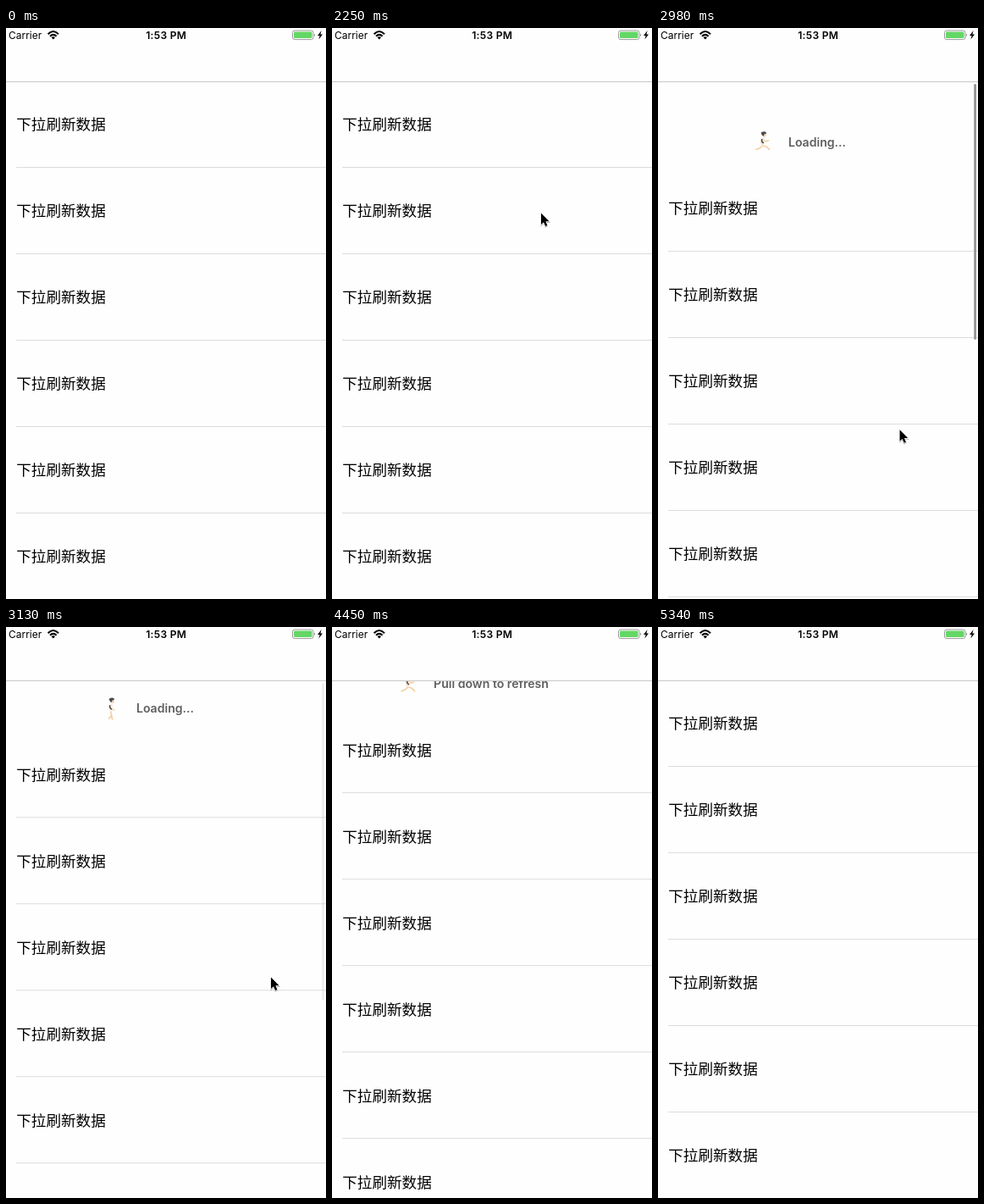
Write an HTML page that moves like this. It is 378 px wide and 674 px high and loops after 5830 ms.

```html
<!DOCTYPE html>
<html lang="zh-CN">
<head>
<meta charset="utf-8">
<title>Pull to refresh</title>
<style>
  html, body { margin: 0; width: 100%; height: 100%; overflow: hidden; background: #fefefe; }
  svg { display: block; width: 378px; height: 674px; }
  text { font-family: Inter, Roboto, sans-serif; fill: #000; }
  .row text { font: 17.6px "Noto Sans CJK SC", "Noto Sans CJK", "Noto Sans", sans-serif; }
  #label { font-size: 14.1px; font-weight: 600; fill: #5f5f5f; }
  #limbs { fill: none; stroke: #f3cfa0; stroke-width: 1.6; stroke-linecap: round; stroke-linejoin: round; }
  #cursor { filter: drop-shadow(0 1px .7px rgba(0, 0, 0, .3)); }
</style>
</head>
<body>
<svg viewBox="0 0 378 674">
  <defs>
    <clipPath id="below"><rect y="64" width="378" height="610"/></clipPath>
  </defs>
  <rect width="378" height="674" fill="#fefefe"/>

  <g clip-path="url(#below)">
    <g id="list">
      <g id="header">
        <text id="label" x="188" y="41" text-anchor="middle"></text>
        <g id="runner">
          <path id="limbs"/>
          <path d="M7 9H10L9.6 14L9 18H6.8L6.6 14Z" fill="#f6e6dc"/>
          <path d="M6.8 10.5Q6 13.2 8.6 14.6" fill="none" stroke="#34353a" stroke-width="1.3" stroke-linecap="round"/>
          <circle cx="9.8" cy="5.6" r="2.1" fill="#f0d0b4"/>
          <path d="M5.6 2.8Q7 1 9.6 1.2Q12.2 1.4 12 3.8L9.6 4.2L9 6.4Q7 6.6 6.6 4.8Z" fill="#4a4a4e"/>
        </g>
      </g>
    </g>
    <rect id="bar" x="373.2" y="66" width="2.8" rx="1.4" fill="#959595"/>
  </g>
  <rect y="63" width="378" height="1" fill="#c8c8c8"/>

  <text x="3" y="13" font-size="12">Carrier</text>
  <g fill="none" stroke="#000" stroke-width="2">
    <path d="M49.6 7.3Q55.8 .9 62 7.3"/>
    <path d="M52 9.7Q55.8 6 59.6 9.7"/>
  </g>
  <path d="M53.6 11.2Q55.8 9.3 58 11.2L55.8 13.6Z"/>
  <text x="189.2" y="12.8" font-size="12.1" font-weight="600" letter-spacing=".28" text-anchor="middle">1:53 PM</text>
  <rect x="338.5" y="3" width="24.5" height="10.6" rx="2.6" fill="none" stroke="#9a9a9a"/>
  <rect x="340" y="4.5" width="21.5" height="7.6" rx="1.3" fill="#63d766"/>
  <path d="M364 6.5Q366 8.3 364 10.1Z" fill="#8c8c8c"/>
  <path d="M372.6 3L368 9H370.6L369.4 13.6L374 7.4H371.4Z"/>

  <path id="cursor" d="M0 .5V14L3 11.2L5.2 16L7.4 15L5.4 10.3H9.6Z" stroke="#fff" stroke-width="1.3" paint-order="stroke"/>
</svg>
<script>
const LOOP = 5830, START = 1500, BEAT = 147.3, ROW = 102;
const GRAB_Y = 218, GRIP = .387, REST = 55.2;
const RELEASE = 10, CLOSE = 18.76, CLOSE_BEATS = 2.7;
const $ = id => document.getElementById(id);

// Pointer key points: [beat, x, y]
const visit = [[0, 294, 460], [2, 286, 221], [3, 286, 221], [4, 247, 218], [6, 247, 218],
  [7, 252, 630], [8, 261, 457], [9, 275, 497], [11, 313, 413], [20, 313, 413]];
const exit = [[24, 373, 657], [26, 351, 671]];

for (let i = 0; i < 6; i++) {
  $('list').insertAdjacentHTML('beforeend',
    `<g class="row" transform="translate(0 ${i * ROW})"><text x="12.2" y="120.4">下拉刷新数据</text>` +
    `<rect x="12" y="164" width="366" height="1" fill="#dcdcdc"/></g>`);
}

const move = (el, x, y) => el.setAttribute('transform', `translate(${x} ${y})`);
const clamp = v => Math.min(1, Math.max(0, v));

function follow(keys, n, power) {
  const i = keys.findIndex(k => k[0] > n);
  if (i < 1) return null;
  const [a, b] = [keys[i - 1], keys[i]];
  const u = ((n - a[0]) / (b[0] - a[0])) ** power;
  return [a[1] + (b[1] - a[1]) * u, a[2] + (b[2] - a[2]) * u];
}

const pointerAt = n => follow(visit, n, 1.85) || follow(exit, n, 1);

// Dragging follows the hand, then the list settles and eases shut.
function pullAt(n) {
  if (n < 7) return 0;
  if (n <= RELEASE) return GRIP * (pointerAt(n)[1] - GRAB_Y);
  const settled = REST + 44 * .115 ** (n - RELEASE);
  const u = clamp((n - CLOSE) / CLOSE_BEATS);
  return settled * (1 + Math.cos(Math.PI * u)) / 2;
}

function labelAt(n) {
  if (n < 7 || n > CLOSE) return 'Pull down to refresh';
  return n < RELEASE ? 'Release to refresh' : 'Loading...';
}

// Two-part limb; angles are measured forward from straight down.
function limb(x, y, upper, lower, length) {
  const kx = x + length * Math.sin(upper), ky = y + length * Math.cos(upper);
  return `M${x} ${y}L${kx} ${ky}L${kx + length * Math.sin(lower)} ${ky + length * Math.cos(lower)}`;
}

function limbs(phase) {
  return [phase, phase + Math.PI].map(p => {
    const thigh = .2 + Math.sin(p), arm = -.8 * Math.sin(p);
    const bend = Math.max(0, .4 + .5 * Math.cos(p));
    return limb(7.8, 17.5, thigh, thigh - bend, 4.7) + limb(8.5, 10.5, arm, arm + 1.1, 3.6);
  }).join('');
}

function draw(t) {
  const n = Math.floor((t - START) / BEAT);
  const pull = pullAt(n), spot = pointerAt(n);

  move($('list'), 0, pull);
  $('label').textContent = labelAt(n);
  move($('runner'), 150 - $('label').getComputedTextLength() / 2, 22);
  $('limbs').setAttribute('d', limbs((n - 11) * Math.PI / 2));
  $('header').style.visibility = pull ? 'visible' : 'hidden';

  $('bar').setAttribute('height', 488 - 1.88 * pull);
  $('bar').style.opacity = n < 7 ? 0 : clamp(.15 ** (n - RELEASE));
  $('cursor').style.display = spot ? '' : 'none';
  if (spot) move($('cursor'), ...spot);
}

const start = performance.now();
function tick() {
  draw((performance.now() - start) % LOOP);
  requestAnimationFrame(tick);
}
tick();
</script>
</body>
</html>
```
